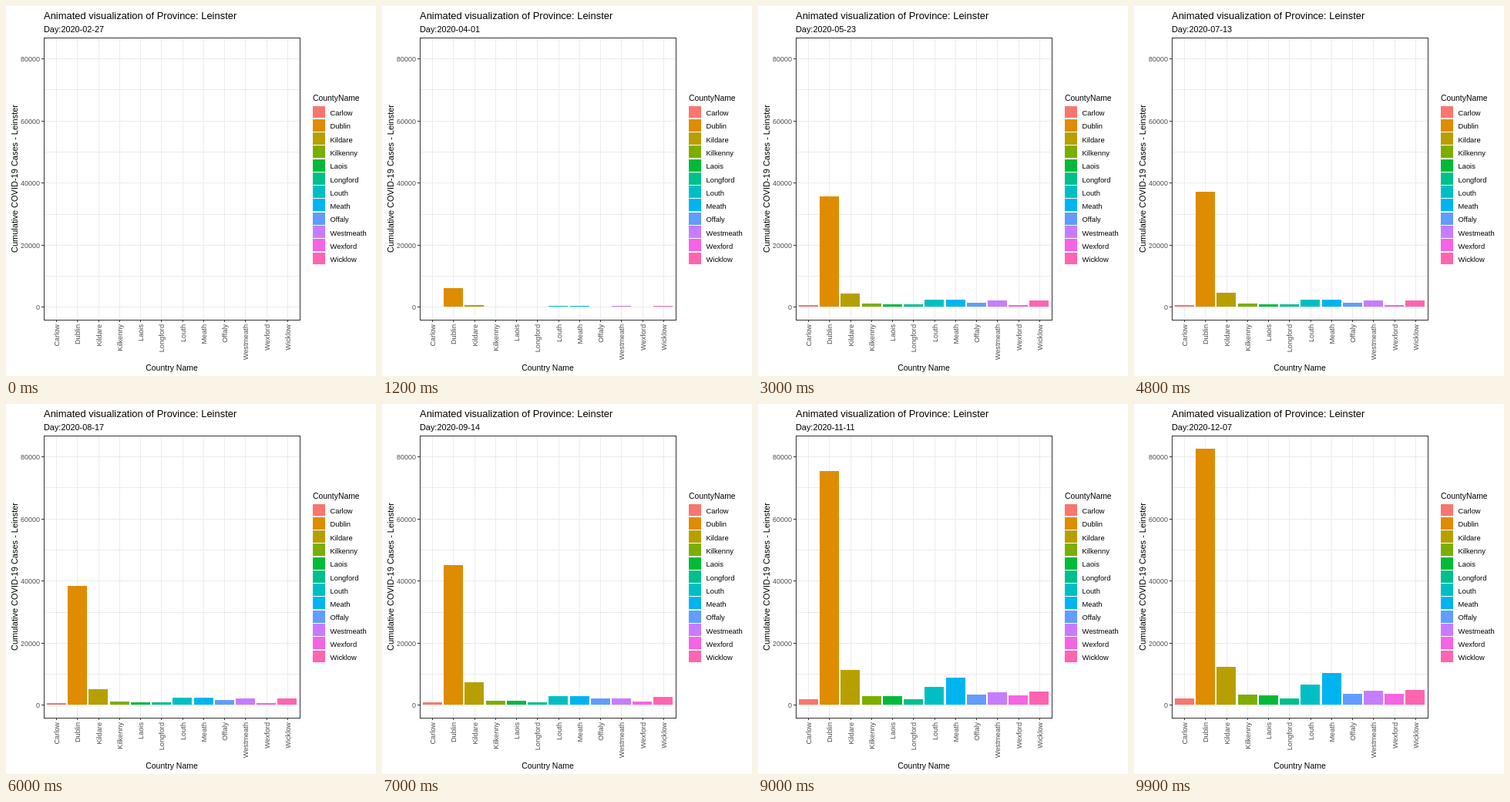
Animation of 480 by 480 pixels, one loop 10 s. Source, as an HTML page with a canvas:

```html
<!DOCTYPE html>
<html lang="en">
<head>
<meta charset="utf-8">
<title>Province chart</title>
<style>
html, body { margin: 0; width: 100%; height: 100%; overflow: hidden; background: #fff; }
canvas { display: block; width: 480px; height: 480px; }
</style>
</head>
<body>
<canvas id="stage" width="480" height="480"></canvas>
<script>
const ctx = document.getElementById('stage').getContext('2d');
const FONT = '"Liberation Sans", Arial, sans-serif';
const STEPS = 100, STEP_MS = 100, LAST_DAY = 284;
const ZERO = 390.4, PER_K = 4.028;
const LEFT = 49, RIGHT = 381, TOP = 41, BOTTOM = 407;
const FIRST_X = 65.26, GAP = 27.225, BAR = 25;
const KEY_GAP = 17.28;

// Name, colour, then thousands of cases added in spring, summer and autumn
const COUNTIES = [
  ['Carlow', '#F8766D', .57, .22, 1.29],
  ['Dublin', '#DE8C00', 37.1, 7.93, 37.5],
  ['Kildare', '#B79F00', 4.57, 2.73, 4.97],
  ['Kilkenny', '#7CAE00', 1.09, .25, 1.99],
  ['Laois', '#00BA38', .84, .5, 1.74],
  ['Longford', '#00C08B', .84, .07, 1.18],
  ['Louth', '#00BFC4', 2.33, .5, 3.72],
  ['Meath', '#00B4F0', 2.33, .5, 7.45],
  ['Offaly', '#619CFF', 1.39, .7, 1.49],
  ['Westmeath', '#C77CFF', 2.11, .04, 2.42],
  ['Wexford', '#F564E3', .6, .5, 2.48],
  ['Wicklow', '#FF64B0', 2.11, .48, 2.23]
];

const ramp = (day, from, to) => Math.min(1, Math.max(0, (day - from) / (to - from)));

// Three waves: an S-curve (earlier where it is larger), a slow start, a slow end
function cases(day, spring, summer, autumn) {
  const peak = 44 - spring / 25, spread = 12 + spring / 23;
  return spring * Math.exp(-Math.exp((peak - day) / spread))
    + summer * ramp(day, 138, 201) ** 3
    + autumn * (1 - (1 - ramp(day, 201, LAST_DAY)) ** 1.4);
}

function rect(x, y, w, h, color) {
  ctx.fillStyle = color;
  ctx.fillRect(x, y, w, h);
}

function text(str, x, y, size, color = '#000', align = 'left', turned = false) {
  ctx.save();
  ctx.translate(x, y);
  if (turned) ctx.rotate(-Math.PI / 2);
  ctx.font = size + 'px ' + FONT;
  ctx.textAlign = align;
  ctx.fillStyle = color;
  ctx.fillText(str, 0, 0);
  ctx.restore();
}

const columnX = i => Math.round(FIRST_X + GAP * i);
const rowY = k => Math.round(ZERO - k * PER_K);

function drawGrid() {
  for (let k = 0; k <= 80; k += 10) rect(LEFT, rowY(k), RIGHT - LEFT, 1, '#ebebeb');
  COUNTIES.forEach((c, i) => rect(columnX(i), TOP, 1, BOTTOM - TOP, '#ebebeb'));
}

function drawBars(day) {
  COUNTIES.forEach(([name, color, ...waves], i) => {
    const top = rowY(cases(day, ...waves));
    const x = Math.round(FIRST_X + GAP * i - 12.25);
    rect(x, top, BAR, rowY(0) - top, color);
  });
}

function drawAxes() {
  ctx.strokeStyle = '#333';
  ctx.lineWidth = 1;
  ctx.strokeRect(LEFT + .5, TOP + .5, RIGHT - LEFT, BOTTOM - TOP);
  for (let k = 0; k <= 80; k += 20) {
    rect(LEFT - 3, rowY(k), 3, 1, '#333');
    text(k * 1000, 44, rowY(k) + 4, 9, '#4d4d4d', 'right');
  }
  COUNTIES.forEach(([name], i) => {
    rect(columnX(i), BOTTOM + 1, 1, 2, '#333');
    text(name, columnX(i) + 4, 413, 9.2, '#4d4d4d', 'right', true);
  });
  text('Country Name', 215, 473, 10.5, '#000', 'center');
  text('Cumulative COVID-19 Cases - Leinster', 15, 224, 11, '#000', 'center', true);
}

function drawLegend() {
  text('CountyName', 398, 123, 10.4);
  COUNTIES.forEach(([name, color], i) => {
    const y = 129.5 + KEY_GAP * i, top = Math.round(y);
    rect(398, top, 16, Math.round(y + 15.89) - top, color);
    text(name, 420.5, Math.round(y + 12.7), 9.35);
  });
}

function draw(step) {
  const day = step * LAST_DAY / (STEPS - 1);
  const date = new Date(Date.UTC(2020, 1, 27 + Math.floor(day + 1e-6)));
  rect(0, 0, 480, 480, '#fff');
  drawGrid();
  drawBars(day);
  drawAxes();
  drawLegend();
  text('Animated visualization of Province: Leinster', 49, 17, 12.95);
  text('Day:' + date.toISOString().slice(0, 10), 49, 34, 10.9);
}

const start = performance.now();
function tick(now) {
  draw(Math.floor(Math.max(0, now - start) / STEP_MS) % STEPS);
  requestAnimationFrame(tick);
}
draw(0);
requestAnimationFrame(tick);
</script>
</body>
</html>
```
